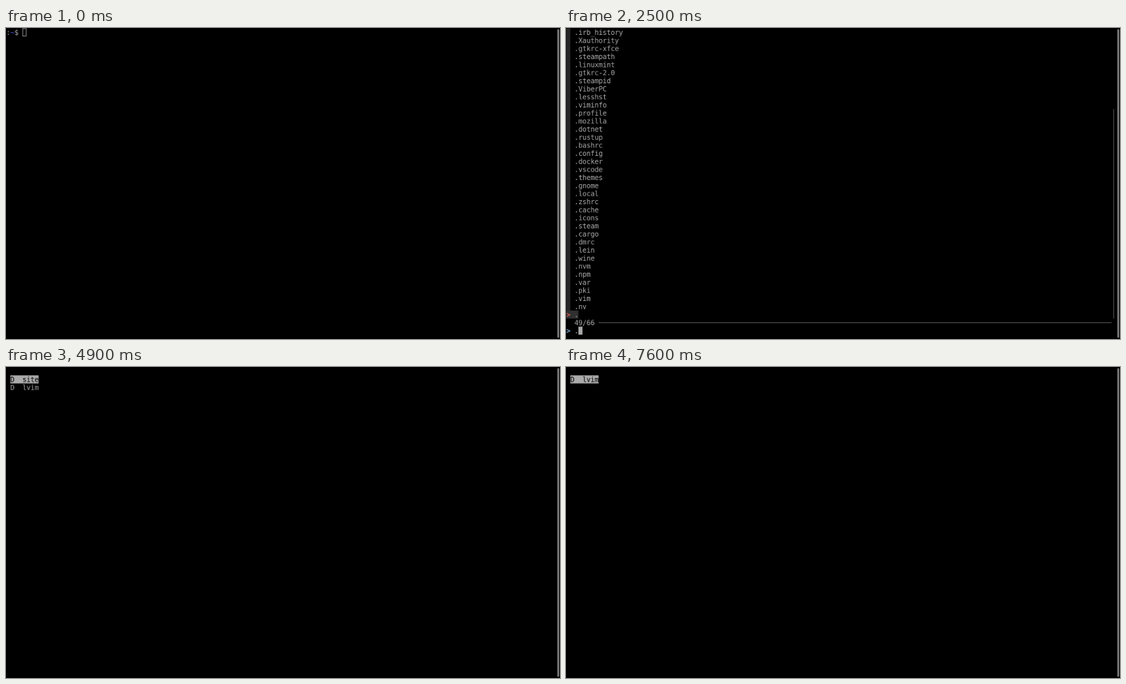
Write an HTML page with a canvas that moves like this. It is 800 px wide and 450 px high and loops after 8 s.

```html
<!DOCTYPE html>
<html lang="en">
<head>
<meta charset="utf-8">
<title>Terminal file browser</title>
<style>
  html, body { margin: 0; width: 100%; height: 100%; overflow: hidden; background: #000; }
  canvas { display: block; }
</style>
</head>
<body>
<canvas id="stage" width="800" height="450"></canvas>
<script>
// The terminal is drawn on a 1920 x 1080 screen and shown scaled down.
const LOOP = 8000, W = 1920, H = 1080;
const CW = 14, RH = 28, PAD = 1, ASCENT = 23;
const FONT = '24px "DejaVu Sans Mono", monospace';
const GREY = "#aaa", BLUE = "#5555ff", GUTTER = "#262626", LINE = "#6c6c6c";

const stage = document.getElementById("stage").getContext("2d");
stage.imageSmoothingQuality = "high";
const screen = document.createElement("canvas");
screen.width = W;
screen.height = H;
const ctx = screen.getContext("2d");

const colX = c => PAD + c * CW;
const rowY = r => PAD + r * RH;

function rect(x, y, w, h, color) {
  ctx.fillStyle = color;
  ctx.fillRect(x, y, w, h);
}

const cells = (row, col, cols, rows, color) =>
  rect(colX(col), rowY(row), cols * CW, rows * RH, color);

function put(row, col, text, color = GREY, weight = "") {
  ctx.font = weight + " " + FONT;
  ctx.fillStyle = color;
  [...text].forEach((ch, i) => ctx.fillText(ch, colX(col + i), rowY(row) + ASCENT));
}

function cursor(row, col, hollow) {
  if (!hollow) return cells(row, col, 1, 1, GREY);
  ctx.strokeStyle = GREY;
  ctx.lineWidth = 2;
  ctx.strokeRect(colX(col) + 1, rowY(row) + 1, CW - 2, RH - 2);
}

// Shell prompt with typed text; cursor is "solid", "hollow" or absent
const shell = (typed, mark) => () => {
  put(0, 0, ":");
  put(0, 1, "~", BLUE);
  put(0, 2, "$");
  put(0, 4, typed);
  if (mark) cursor(0, 4 + typed.length, mark === "hollow");
};

// Directory listing; entries are "D name" or "F name"
const list = (items, selected = 0) => () => items.forEach((item, i) => {
  const text = item[0] + "  " + item.slice(2);
  const on = i === selected;
  if (on) cells(i + 1, 1, text.length, 1, GREY);
  put(i + 1, 1, text, on ? "#000" : GREY);
});

// Fuzzy finder; best match last, next to the prompt
const finder = (query, names, count, scroll) => () => {
  const first = 36 - names.length, best = names.at(-1);
  cells(first, 0, 1, names.length - 1, GUTTER);
  cells(35, 0, 2 + best.length, 1, "#303030");
  put(35, 0, ">", "#d75f5f", "bold");
  names.forEach((name, i) => put(first + i, 2, name));
  put(36, 2, count);
  const ruleX = colX(3 + count.length);
  rect(ruleX, rowY(36) + RH / 2 - 1, colX(135) - ruleX, 2, LINE);
  if (scroll) rect(colX(135) + CW / 2 - 1, rowY(10), 2, 26 * RH, LINE);
  put(37, 0, ">", "#87afd7", "bold");
  put(37, 2, query);
  cursor(37, 2 + query.length);
};

const blank = () => {};
const lines = text => text.trim().split("\n");

const home = lines(String.raw`
D Рабо�~Gий �~A�~Bол
D .cargo
D .vim
F .irb_history
D .themes
D .mozilla
D �~Tок�~Cмен�~B�~K
F ^B^C^A
F .gtkrc-xfce
D .vscode
D .steam
D Шаблон�~K
F .bash_history-17344.tmp
D programming
F .bash_logout
D .wine
F ^Pa~C^S�^?
D .icons
F .gtkrc-2.0
F .xsession-errors.old
F 2025-01-12 20-42-00.mkv
D .pki
F ���~A�[
F .profile
D .linuxmint
F .bash_history-06579.tmp
D �~\�~Cз�~Kка
D .docker
D .config
F .nvidia-settings-rc
D �~Rидео
D .var
D .steampath
F .bashrc`);

const dotNames = (".irb_history .Xauthority .gtkrc-xfce .steampath .linuxmint .gtkrc-2.0 .steampid " +
  ".ViberPC .lesshst .viminfo .profile .mozilla .dotnet .rustup .bashrc .config .docker .vscode " +
  ".themes .gnome .local .zshrc .cache .icons .steam .cargo .dmrc .lein .wine .nvm .npm .var .pki " +
  ".vim .nv .").split(" ");
const dotL = ".xsession-errors.old .bash_logout .mozilla .profile .linuxmint .lesshst .local .lein".split(" ");

const homeEnd = lines(`
D .local
F .lesshst
D .npm
F .bash_history-21068.tmp
F .dmrc
D .nv`);

const local = ["D bin", "D share", "D state"];

const share = lines(`
D lunarvim
D applications
D icons
D themes
D fonts
D keyrings
D gvfs-metadata
F recently-used.xbel
D nemo
D nemo-python-extension-data
D xfce4
D nvim
D mime
D sounds
D backgrounds
D cinnamon
D flatpak
D Trash
D man
D desktop-directories
D evolution
D webkitgtk
D xorg
D vulkan
D gem
D sessions`);

const data = ["D site", "D lvim"];

const repo = lines(`
F CHANGELOG.md
F .luacheckrc
F .luarc.json
D lua
D utils
D .git
F Makefile
F .pre-commit-config.yaml
F LICENSE
F init.lua
F .gitignore
F README.md
D tests
F .stylua.toml
D .github
D snapshots
F CONTRIBUTING.md`);

const steps = [
  [0, shell("", "hollow")],
  [100, shell("", "solid")],
  [700, shell(".", "solid")],
  [1000, shell("./", "solid")],
  [1100, shell("./fm", "solid")],
  [1300, shell("./fm")],
  [1400, blank],
  [1500, list(home)],
  [2500, finder(".", dotNames, "49/66", true)],
  [2800, finder(".l", dotL, "8/66")],
  [2900, finder(".lo", [".bash_logout", ".local"], "2/66")],
  [3000, finder(".loc", [".local"], "1/66")],
  [3100, finder(".loca", [".local"], "1/66")],
  [3300, blank],
  [3400, list(homeEnd)],
  [3600, blank],
  [3700, list(local)],
  [4100, list(local, 1)],
  [4400, list(share)],
  [4900, list(data)],
  [5200, list(data, 1)],
  [5400, blank],
  [5500, list(repo)],
  [5700, list(repo, 1)],
  [5900, list(repo, 2)],
  [6100, list(repo, 3)],
  [7600, list(["D lvim"])]
];

function render(draw) {
  rect(0, 0, W, H, "#000");
  draw();
  ctx.fillStyle = "#858585";
  ctx.beginPath();
  ctx.roundRect(1911, 4, 6, 1072, 3);
  ctx.fill();
  stage.drawImage(screen, 0, 0, 800, 450);
}

let shown = -1;
const start = performance.now();
function tick() {
  const t = (performance.now() - start) % LOOP;
  const now = steps.findLastIndex(([at]) => at <= t);
  if (now !== shown) {
    render(steps[now][1]);
    shown = now;
  }
  requestAnimationFrame(tick);
}
tick();
</script>
</body>
</html>
```
